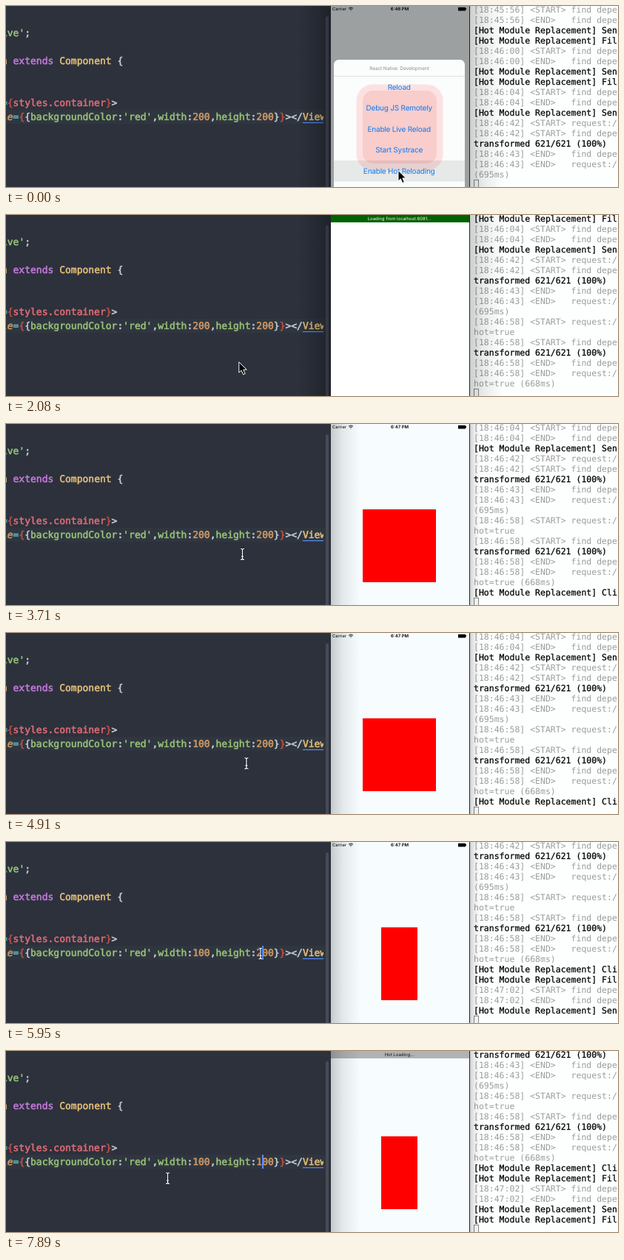
An HTML page that plays this animation: 827x246 px, repeating every 8000 ms.

```html
<!DOCTYPE html>
<html lang="en">
<head>
<meta charset="utf-8">
<title>Hot reloading</title>
<style>
  html, body { margin: 0; width: 100%; height: 100%; overflow: hidden; background: #2c313c; }
  svg { display: block; }
  text { white-space: pre; text-rendering: geometricPrecision; }
  .code text { font: 13px "DejaVu Sans Mono", monospace; }
  .code text, .code tspan { fill: currentColor; stroke: currentColor; stroke-width: .55px; }
  .code text { color: #c5cad3; }
  .code .purple { color: #c678dd; }
  .code .yellow { color: #e5c07b; }
  .code .green { color: #98c379; }
  .code .red { color: #e06c75; }
  .code .brace { color: #be5046; }
  .code .orange { color: #d19a66; }
  .code .cyan { color: #56b6c2; }
  .code .attr { color: #d19a66; font-style: italic; }
  #log text { font: 11.5px "DejaVu Sans Mono", monospace; fill: #9c9c9c; }
  #log .strong { fill: #000; stroke: #000; stroke-width: .25px; }
  .ui { font-family: Inter, sans-serif; text-anchor: middle; }
  #rows text { font-size: 10px; letter-spacing: -.22px; fill: #0a7bf5; }
</style>
</head>
<body>
<svg width="827" height="246" viewBox="0 0 827 246">
  <defs>
    <clipPath id="codeClip"><rect width="429" height="246"/></clipPath>
    <clipPath id="phoneClip"><rect x="439" width="187" height="246"/></clipPath>
    <linearGradient id="fadeRight">
      <stop offset="0" stop-opacity=".2"/>
      <stop offset=".4" stop-opacity=".08"/>
      <stop offset="1" stop-opacity="0"/>
    </linearGradient>
    <linearGradient id="fadeLeft">
      <stop offset="0" stop-opacity="0"/>
      <stop offset="1" stop-opacity=".3"/>
    </linearGradient>
    <path id="beamShape" d="M-2.5 -7.5Q0 -7.5 0 -5.5V5.5Q0 7.5 -2.5 7.5M2.5 -7.5Q0 -7.5 0 -5.5M2.5 7.5Q0 7.5 0 5.5M-1.5 3h3"/>
  </defs>

  <!-- editor -->
  <rect width="439" height="246" fill="#2c313c"/>
  <rect y="141" width="432" height="19" fill="#30363f"/>
  <g class="code" id="code" clip-path="url(#codeClip)"></g>
  <rect id="caret" y="141" width="2" height="19" fill="#528bff"/>
  <rect x="432" y="14" width="4" height="240" rx="2" fill="#474b56"/>
  <rect id="editorShade" x="394" width="45" height="246" fill="url(#fadeLeft)"/>

  <!-- terminal -->
  <rect x="626" width="201" height="246" fill="#fdffff"/>
  <g id="log"></g>
  <rect id="block" y="236.5" width="6" height="12" fill="none" stroke="#8a8a8a"/>
  <rect id="termShade" x="626" height="246" fill="url(#fadeRight)"/>

  <!-- phone -->
  <g class="ui" clip-path="url(#phoneClip)">
    <rect id="app" x="438" width="188" height="246"/>
    <rect id="box" y="116" height="99" fill="#f00"/>
    <g id="status">
      <text x="441" y="6" font-size="5.8" text-anchor="start">Carrier</text>
      <path d="M463 3.2Q466 .6 469 3.2M464.3 4.6Q466 3.2 467.7 4.6M465.6 5.9h.8" fill="none" stroke="#000" stroke-width=".9"/>
      <text id="clock" x="532" y="6" font-size="6" font-weight="600"></text>
      <path d="M611 1.8h10v1.2h1v2h-1v1.4h-10z"/>
    </g>
    <g id="banner">
      <rect id="bannerBack" x="438" width="188" height="10"/>
      <text id="bannerText" x="531.5" y="7.2" font-size="6"></text>
    </g>
    <rect id="dim" x="438" width="188" height="246"/>
    <g id="sheet">
      <rect x="443" y="73" width="177" height="300" rx="6.5" fill="#fbfcfc"/>
      <rect x="443" y="95" width="177" height="1" fill="#dfe1e2"/>
      <g id="pressed">
        <rect x="473.5" y="106.5" width="117" height="117" rx="22" fill="#fbe2e1"/>
        <rect x="482" y="115" width="100" height="99" rx="14" fill="#f8cdcc"/>
        <rect x="443" y="210" width="177" height="28.5" opacity=".08"/>
      </g>
      <path id="rules" d="M443 181.5h177M443 209.8h177M443 238.5h177" stroke="#d4d6d7"/>
      <text x="531.5" y="87.3" font-size="6.5" letter-spacing="-.1" fill="#8d8f90">React Native: Development</text>
      <g id="rows"></g>
    </g>
  </g>
  <rect id="phoneShade" x="439" width="40" height="246" fill="url(#fadeRight)"/>
  <rect x="626" width="1" height="246" fill="#222"/>

  <!-- pointers -->
  <path id="arrow" d="M0 0V14.4L3.3 11.4L5.7 17L8.3 15.9L5.9 10.4H10.4Z" stroke="#fff" stroke-linejoin="round"/>
  <g id="beam" fill="none">
    <use href="#beamShape" stroke="#15181e" stroke-width="2.6"/>
    <use href="#beamShape" stroke="#fff" stroke-width="1.2"/>
  </g>
</svg>
<script>
const LOOP = 8000, TICK = 148.8, LEAD = 10;
const PITCH = 7.826, TERM_PITCH = 6.923, ROWS = 17;

// Moments, in ticks
const RELOAD = 10, BUILT = 14, LOADED = 15, BEAM = 20, CLICK = 22, MINUTE = 23, APPLIED = 38, CLICK2 = 40;
const edits = [
  { column: 28, click: CLICK, erase: 28, type: 30 },
  { column: 39, click: CLICK2, erase: 45, type: 46 }
];
const banners = [
  { from: 11, to: 16, lift: 4.2, text: 'Loading from localhost:8081...', back: '#006200', ink: '#fff' },
  { from: 36, to: 39, lift: 5, text: 'Hot Loading...', back: '#b0b2b3', ink: '#111' },
  { from: 50, to: 53.5, lift: 5, text: 'Hot Loading...', back: '#b0b2b3', ink: '#111' }
];
const moves = [
  { from: 10, to: 16, x: 239.5, y: 191.5 },
  { from: 16, to: 18, x: 232, y: 186 },
  { from: 18, to: CLICK, x: 260, y: 151 },
  { from: CLICK, to: 25, x: 319.5, y: 177 },
  { from: 32, to: 36, x: 354, y: 178 },
  { from: 36, to: CLICK2, x: 344, y: 151.5 },
  { from: 40, to: 41, x: 363.5, y: 193 },
  { from: 51, to: 53, x: 218.5, y: 173 }
];

const $ = id => document.getElementById(id);
const set = (id, attrs) => {
  for (const name in attrs) $(id).setAttribute(name, attrs[name]);
};
const show = (id, on) => { $(id).style.display = on ? '' : 'none'; };
const esc = s => s.replace(/</g, '&lt;');
const progress = (k, from, to) => Math.min(1, Math.max(0, (k - from) / (to - from)));
const smooth = p => p * p * (3 - 2 * p);

// Log batches, keyed by the tick of their arrival
const hmr = word => '[Hot Module Replacement] ' + word;
const mark = (time, tag, what = 'find depe') => `[18:${time}] ${tag.padEnd(7)} ${what}`;
const begin = (time, what) => mark(time, '<START>', what);
const end = (time, what) => mark(time, '<END>', what);
const update = time => [hmr('Fil'), begin(time), end(time), hmr('Sen')];
const built = time => ['transformed 621/621 (100%)', end(time), end(time, 'request:/')];
const batches = {
  0: [...['45:56', '46:00', '46:04'].flatMap(update),
    begin('46:42', 'request:/'), begin('46:42'), ...built('46:43'), '(695ms)'],
  [RELOAD]: [begin('46:58', 'request:/'), 'hot=true', begin('46:58')],
  [BUILT]: [...built('46:58'), 'hot=true (668ms)'],
  16: [hmr('Cli')],
  36: [hmr('Fil')],
  37: [begin('47:02'), end('47:02')],
  38: [hmr('Sen')],
  50: [hmr('Fil')]
};

// Code markup: [colour|text] is a coloured run
const paint = s => esc(s).replace(/\[(\w+)\|([^\]]*)\]/g, '<tspan class="$1">$2</tspan>');
const codeLine = (s, row) => `<text x="-6.1" y="${41 + 19 * row}">${paint(s)}</text>`;
const value = (k, { erase, type }) => k < erase ? '200' : k < type ? '00' : '100';

['Reload', 'Debug JS Remotely', 'Enable Live Reload', 'Start Systrace', 'Enable Hot Reloading']
  .forEach((label, i) => {
    $('rows').innerHTML += `<text x="531.2" y="${113.5 + 28.5 * i}">${label}</text>`;
  });

function drawEditor(k) {
  const [w, h] = edits.map(edit => value(k, edit));
  const underline = 401 - (6 - w.length - h.length) * PITCH;
  $('code').innerHTML =
    codeLine("[green|ive'];", 0) +
    codeLine('[yellow|n] [purple|extends] [yellow|Component] {', 2) +
    codeLine('[cyan|=][brace|{][red|styles.container][brace|}]>', 5) +
    codeLine(`[attr|le][cyan|=][brace|{]{[green|backgroundColor]:[green|'red'],` +
      `[green|width]:[orange|${w}],[green|height]:[orange|${h}]}[brace|}]></[yellow|View]>`, 6) +
    `<rect x="${underline}" y="158" width="31.3" height="1.2" fill="#528bff"/>`;

  // The caret restarts its blink at every click and keystroke.
  const edit = edits.filter(e => e.click <= k).pop();
  show('caret', edit);
  if (!edit) return;
  const last = Math.max(...[edit.click, edit.erase, edit.type].filter(v => v <= k));
  const column = edit.column + (last === edit.erase ? 0 : 1);
  set('caret', { x: Math.round(33 + column * PITCH) });
  show('caret', Math.floor((k - last) / 3) % 2 === 0);
}

function drawTerminal(k) {
  const lines = Object.entries(batches).filter(([tick]) => tick <= k).flatMap(b => b[1]);
  const rows = lines.slice(-ROWS);
  let column = 0;
  if (k >= RELOAD && k < BUILT) {
    const p = progress(k, RELOAD, BUILT), total = Math.round(5 + 616 * p), share = .4 + .6 * p;
    rows.push(`transformed ${Math.round(total * share)}/${total} (${Math.round(share * 100)}%)`);
    column = rows[ROWS].length;
  }
  $('log').innerHTML = rows.map((line, i) => {
    const cls = /^(\[Hot|trans)/.test(line) ? 'strong' : '';
    return `<text class="${cls}" x="632" y="${9 + 14 * i}">${esc(line)}</text>`;
  }).join('');
  set('block', { x: 632.5 + column * TERM_PITCH });
}

function drawPhone(k) {
  const loading = k >= RELOAD && k < LOADED;
  const size = k < APPLIED ? 100 : 50;
  set('app', { fill: loading ? '#fff' : '#f7fdff' });
  set('box', { x: 532 - size / 2, width: size - 1 });
  show('box', !loading);
  $('clock').textContent = k < MINUTE ? '6:46 PM' : '6:47 PM';

  // A banner covers the status bar, then slides up during its last tick.
  const banner = banners.find(b => k >= b.from && k <= b.to);
  const leaving = banner && k === banner.to;
  show('status', !banner || leaving);
  show('banner', banner);
  if (banner) {
    set('banner', { transform: `translate(0 ${leaving ? -banner.lift : 0})` });
    set('bannerBack', { fill: banner.back });
    set('bannerText', { fill: banner.ink });
    $('bannerText').textContent = banner.text;
  }

  const p = progress(k, RELOAD, RELOAD + 3);
  const slide = k < RELOAD ? 0 : 2.5 + 175 * p;
  set('dim', { opacity: .37 * (1 - p) });
  set('sheet', { transform: `translate(0 ${slide})` });
  show('sheet', p < 1);
  show('pressed', k < RELOAD);
  show('rules', k >= RELOAD);
}

function drawPointer(k) {
  let x = 530, y = 223.5;
  for (const m of moves) {
    const p = smooth(progress(k, m.from, m.to));
    x += (m.x - x) * p;
    y += (m.y - y) * p;
  }
  const beam = k >= BEAM;
  show('arrow', !beam);
  show('beam', beam);
  set(beam ? 'beam' : 'arrow', { transform: `translate(${x} ${y})` });
}

// The focused window casts the wider shadow.
function drawShadows(k) {
  const editing = k >= CLICK;
  show('editorShade', !editing);
  show('phoneShade', editing);
  set('termShade', { width: editing ? 16 : 46 });
}

const origin = performance.now();
let last = -1;
function frame() {
  const time = (performance.now() - origin) % LOOP;
  const k = Math.floor((time + LEAD) / TICK);
  if (k !== last) {
    last = k;
    [drawEditor, drawTerminal, drawPhone, drawPointer, drawShadows].forEach(draw => draw(k));
  }
  requestAnimationFrame(frame);
}
frame();
</script>
</body>
</html>
```
